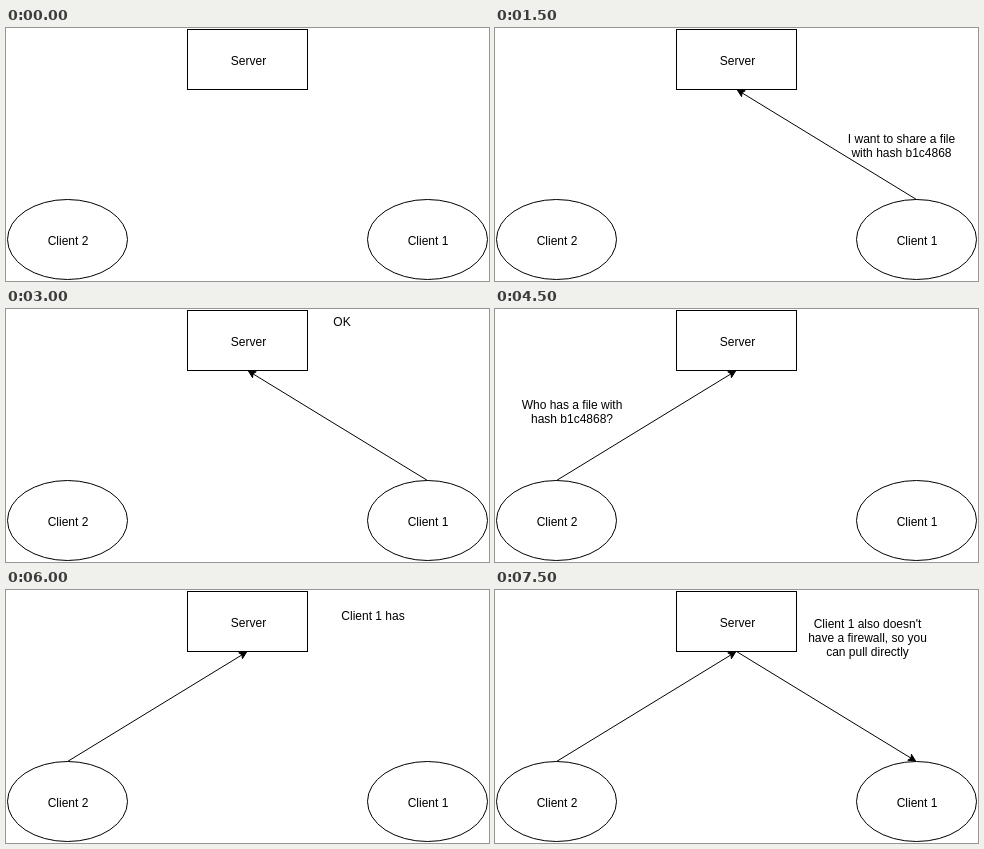
An HTML page that plays this animation: 483 px wide and 253 px high, repeating every 8000 ms.

```html
<!DOCTYPE html>
<html lang="en">
<head>
<meta charset="utf-8">
<title>File sharing</title>
<style>
html, body { margin: 0; width: 100%; height: 100%; overflow: hidden; background: #fff; }
svg { display: block; }
text { font: 12px "Liberation Sans", Arial, sans-serif; text-anchor: middle; }
.shape { fill: #fff; stroke: #000; }
.line { fill: none; stroke: #000; stroke-miterlimit: 10; }
</style>
</head>
<body>
<svg id="stage" width="483" height="253" viewBox="0 0 483 253">
  <rect class="shape" x="181.5" y="1.5" width="120" height="60"/>
  <ellipse class="shape" cx="61.5" cy="211.5" rx="60" ry="40"/>
  <ellipse class="shape" cx="421.5" cy="211.5" rx="60" ry="40"/>
  <text x="242.5" y="37">Server</text>
  <text x="62" y="217">Client 2</text>
  <text x="422" y="217">Client 1</text>
</svg>
<script>
const LOOP = 8000;
const STEP = 1500;
const LINE_HEIGHT = 14;
const stage = document.getElementById("stage");

function add(tag, attrs, parent = stage) {
  const el = document.createElementNS("http://www.w3.org/2000/svg", tag);
  for (const key in attrs) el.setAttribute(key, attrs[key]);
  return parent.appendChild(el);
}

// Straight connector with a notched arrowhead at its end.
function arrow(x1, y1, x2, y2) {
  const g = add("g", {});
  const len = Math.hypot(x2 - x1, y2 - y1);
  const ux = (x2 - x1) / len, uy = (y2 - y1) / len;
  const at = (back, side) =>
    `${x2 - ux * back - uy * side} ${y2 - uy * back + ux * side}`;
  add("path", { class: "line", d: `M${x1} ${y1}L${at(6.4, 0)}` }, g);
  add("path", {
    class: "line",
    style: "fill:#000",
    d: `M${at(1.1, 0)}L${at(8.1, 3.5)}L${at(6.4, 0)}L${at(8.1, -3.5)}Z`
  }, g);
  return g;
}

function label(x, y, ...lines) {
  const g = add("g", {});
  lines.forEach((line, i) => {
    add("text", { x, y: y + i * LINE_HEIGHT }, g).textContent = line;
  });
  return g;
}

const share = arrow(421.5, 171.5, 241.5, 61.5);
const ask = arrow(61.5, 171.5, 241.5, 61.5);
const pull = arrow(241.5, 61.5, 421.5, 171.5);

const steps = [
  [],
  [share, label(406.5, 115, "I want to share a file", "with hash b1c4868")],
  [share, label(336, 17, "OK")],
  [ask, label(77, 100, "Who has a file with", "hash b1c4868?")],
  [ask, label(367, 30, "Client 1 has")],
  [ask, pull, label(372.5, 38, "Client 1 also doesn't", "have a firewall, so you", "can pull directly")]
];
const parts = new Set(steps.flat());

function draw(time) {
  const active = steps[Math.floor((time % LOOP) / STEP)];
  for (const part of parts) {
    part.setAttribute("visibility", active.includes(part) ? "visible" : "hidden");
  }
}

const start = performance.now();
function tick() {
  draw(performance.now() - start);
  requestAnimationFrame(tick);
}
tick();
</script>
</body>
</html>
```
